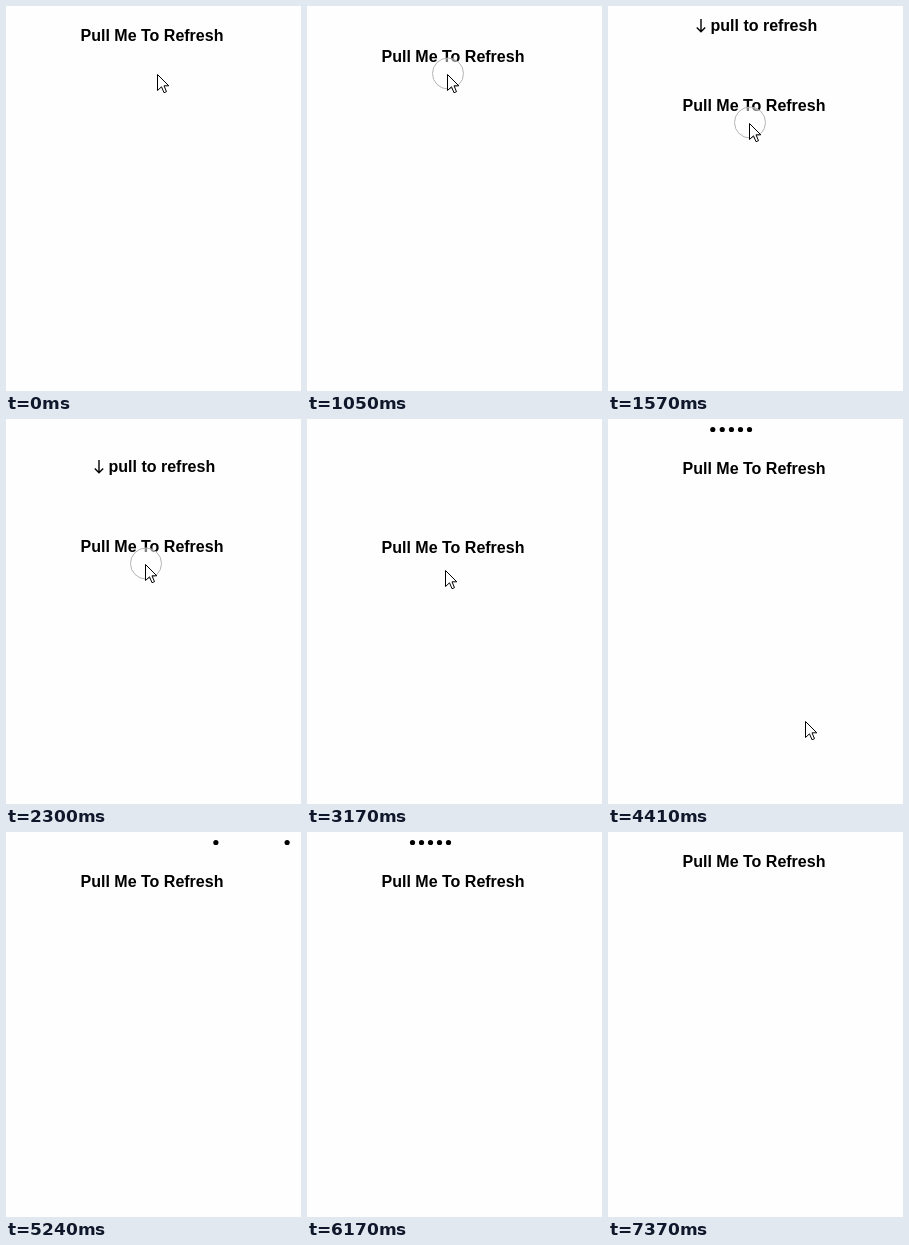
Recreate the animation shown at these times as an HTML page with a canvas. Size 295x385 px, loop 7990 ms.

```html
<!DOCTYPE html>
<html lang="en">
<head>
<meta charset="utf-8">
<title>Pull to refresh</title>
<style>
  html, body { margin: 0; width: 100%; height: 100%; overflow: hidden; background: #fefefe; }
  canvas { display: block; }
</style>
</head>
<body>
<canvas id="stage" width="295" height="385"></canvas>
<script>
const ctx = document.getElementById('stage').getContext('2d');
const LOOP = 7990, REST = 29, BUSY = 49, MAX_PULL = 99;
const RELEASE_AT = 2440, DROP_AT = 3150, BACK_MS = 850, DONE_AT = 6520;

// Pointer tip: [time, x, y]
const pointerPath = [
  [0, 151, 68], [40, 151, 68], [410, 140, 46], [820, 140, 46], [1570, 141, 117],
  [1660, 141, 126], [2300, 139, 145], [2470, 138, 150], [2600, 138, 151],
  [3880, 138, 151], [3940, 144, 167], [4410, 197, 302], [4780, 241, 400]
];

const clamp = (v, lo = 0, hi = 1) => Math.min(hi, Math.max(lo, v));
const lerp = (a, b, p) => a + (b - a) * p;
const progress = (t, start, length) => clamp((t - start) / length);

function pointerAt(t) {
  const i = pointerPath.findIndex(k => k[0] > t);
  if (i < 0) return pointerPath[pointerPath.length - 1].slice(1);
  const [t0, x0, y0] = pointerPath[i - 1], [t1, x1, y1] = pointerPath[i];
  const p = (t - t0) / (t1 - t0);
  return [Math.round(lerp(x0, x1, p)), Math.round(lerp(y0, y1, p))];
}

function titleAt(t, tipY) {
  if (t < 820) return REST;
  if (t < DROP_AT) return REST + clamp(tipY - 47, 0, MAX_PULL);
  if (t < DONE_AT) return Math.round(lerp(REST + MAX_PULL, BUSY, progress(t, DROP_AT + 20, BACK_MS)));
  return Math.round(lerp(BUSY, REST, progress(t, DONE_AT, BACK_MS)));
}

function drawText(text, x, y, align) {
  ctx.font = 'bold 16px "Liberation Sans", Arial, sans-serif';
  ctx.textAlign = align;
  ctx.fillStyle = '#000';
  ctx.fillText(text, x, y + 6);
}

function drawArrow(x, y, angle) {
  ctx.save();
  ctx.translate(x, y);
  ctx.rotate(angle);
  ctx.strokeStyle = '#000';
  ctx.lineWidth = 1.4;
  ctx.stroke(new Path2D('M0-6.5V6M-4.2 2L0 6.3L4.2 2'));
  ctx.restore();
}

function drawHint(t, y) {
  if (t < 820 || t >= DROP_AT) return;
  const release = t >= RELEASE_AT;
  drawArrow(release ? 79 : 93, y + 0.5, Math.PI * progress(t, RELEASE_AT, 400));
  drawText(release ? 'release to refresh' : 'pull to refresh', release ? 89 : 102.5, y, 'left');
}

function drawDots(t, y) {
  if (t < 3850 || t > 6950) return;
  const phase = (t - 3850) % 1600;
  ctx.fillStyle = '#000';
  for (let i = 0; i < 5; i++) {
    const rest = 105.5 + 9 * i, delay = 40 * (4 - i);
    const enter = progress(phase, delay, 560), leave = progress(phase, 940 + delay, 340);
    const x = leave > 0 ? lerp(rest, 300, leave ** 4) : lerp(-4, rest, 1 - (1 - enter) ** 4);
    ctx.beginPath();
    ctx.arc(x, y, 2.6, 0, 7);
    ctx.fill();
  }
}

function drawTouch(t, x, y) {
  const alpha = progress(t, 800, 60) * (1 - progress(t, 2700, 160));
  if (!alpha) return;
  ctx.save();
  ctx.globalAlpha = alpha;
  ctx.beginPath();
  ctx.arc(x + 1, y - 0.5, 15.5, 0, 7);
  ctx.fillStyle = 'rgba(255,255,255,.5)';
  ctx.fill();
  ctx.strokeStyle = '#b4b4b4';
  ctx.lineWidth = 1;
  ctx.stroke();
  ctx.restore();
}

function drawPointer(x, y) {
  ctx.save();
  ctx.translate(x + 0.5, y + 0.5);
  const shape = new Path2D('M0 0V16L4 12.3L6.5 18.2L9 17.2L6.5 11.3H11.3Z');
  ctx.fillStyle = '#fff';
  ctx.fill(shape);
  ctx.strokeStyle = '#000';
  ctx.lineWidth = 1;
  ctx.stroke(shape);
  ctx.restore();
}

function draw(now) {
  const t = now % LOOP;
  const [x, y] = pointerAt(t);
  const title = titleAt(t, y);
  ctx.fillStyle = '#fefefe';
  ctx.fillRect(0, 0, 295, 385);
  drawText('Pull Me To Refresh', 146, title, 'center');
  drawHint(t, title - 80);
  drawDots(t, title - 38.5);
  drawTouch(t, x, y);
  drawPointer(x, y);
}

const start = performance.now();
function tick() {
  draw(performance.now() - start);
  requestAnimationFrame(tick);
}
tick();
</script>
</body>
</html>
```
